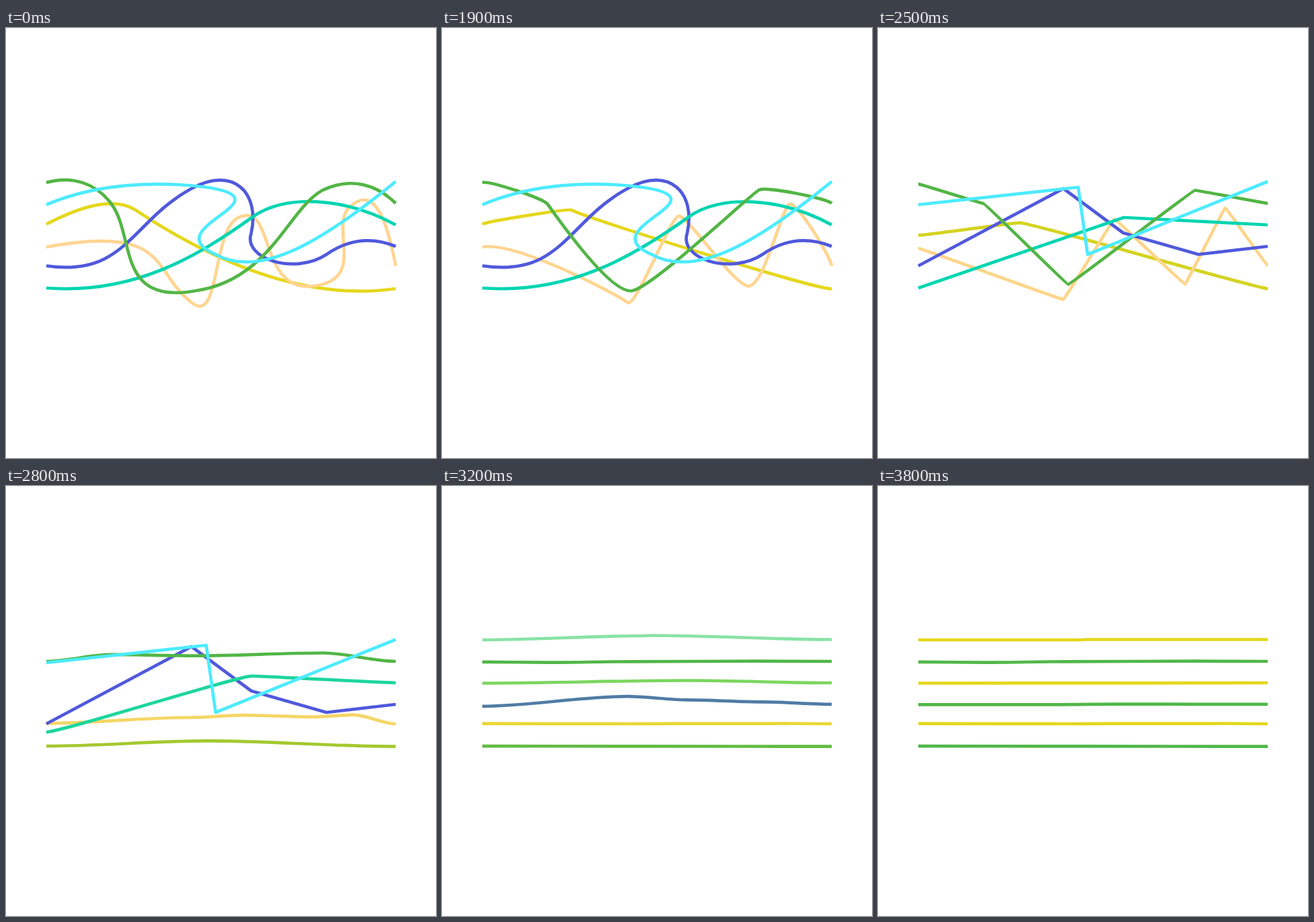
An HTML page that plays this animation: 640 by 640 pixels, repeating every 6.7 s.

```html
<!DOCTYPE html>
<html lang="en">
<head>
<meta charset="utf-8">
<title>Untangling lines</title>
<style>
  html, body { margin: 0; width: 100%; height: 100%; overflow: hidden; background: #fff; }
  svg { display: block; width: 100%; height: 100%; }
  path { fill: none; stroke-width: 4.7; stroke-linejoin: round; }
</style>
</head>
<body>
<svg id="stage" viewBox="0 0 640 640"></svg>
<script>
const LOOP = 6700, STEP = 100;
const MOVE = 400, SETTLE = 250, GAP = 800;
const YELLOW = [229, 215, 28], GREEN = [80, 184, 72];

const stage = document.getElementById('stage');
const lines = [];

const clamp = x => Math.max(0, Math.min(1, x));
const ease = x => { x = clamp(x); return x * x * (3 - 2 * x); };
const mix = (a, b, p) => a + (b - a) * p;

// curl: tangled bezier; flat: resting heights of its vertices;
// start: when it flattens; bow: overshoot; fade: colour change from/to.
function line(curl, flat, start, bow, from, to, fade, flatX) {
  const n = curl.match(/[\d.]+/g).map(Number);
  const pts = [];
  for (let i = 0; i < n.length; i += 2) pts.push([n[i], n[i + 1]]);
  const el = document.createElementNS('http://www.w3.org/2000/svg', 'path');
  stage.append(el);
  const knots = pts.filter((_, i) => i % 3 === 0);
  lines.push({ el, pts, knots, flat, start, bow, from, to, fade,
    flatX: flatX || knots.map(k => k[0]) });
}

line('60 292C118 262 163 252 193 271C300 342 440 408 580 388',
  [387.1, 387.4, 387.6], 2394, -8, YELLOW, GREEN, [2395, 3310], [60, 300, 580]);

line('60 326C245 292 216 362 276 408.5C322 445 304 288 352 280C398 265 378 394 457 384' +
  'C543 375 474 287 517 262C549 238 567 286 580 354',
  [353.7, 354, 353.6, 353.7, 353.5, 354], 2436, -11, [255, 213, 145], YELLOW, [2440, 3400]);

line('60 354C178 371 186 288 276 239C340 204 378 247 365 305C352 344 430 368 477 337' +
  'C510 314 545 311 580 325',
  [325.3, 325.3, 324.6, 324.8, 324.8], 2873, -5, [80, 89, 220], GREEN, [2850, 3800]);

line('60 387C190 397 285 340 366 282C414 246 505 252 580 293',
  [293.5, 293.4, 293], 2678, -7.5, [0, 213, 177], YELLOW, [2680, 3640]);

line('60 230C100 219 135 232 157 262C193 311 163 413 283 391C395 374 420 268 472 241' +
  'C515 221 553 234 580 261',
  [261.8, 262.7, 261.3, 260.7, 261], 2437, -12, [82, 181, 69], GREEN, [2440, 3400]);

line('60 263C135 231 225 227.5 298 237C425 256 220 298 312 337C380 375 478 312 580 228.5',
  [229, 229, 228.5, 228.5], 2800, -6, [77, 235, 255], YELLOW, [2810, 3800]);

function outline(l, t) {
  const loose = 1 - ease((t - l.start + GAP) / MOVE);
  const p = ease((t - l.start) / MOVE);
  const bow = l.bow * p * (1 - ease((t - l.start - MOVE) / SETTLE));
  const last = l.knots.length - 1;
  const at = l.knots.map(([x, y], i) => [
    mix(x, l.flatX[i], p),
    mix(y, l.flat[i], p) + (i && i < last ? bow : 0)
  ]);
  // Handles shrink to corners, then grow level as the line flattens.
  const handle = (seg, side) => {
    const i = seg + side, k = l.knots[i], h = l.pts[seg * 3 + 1 + side];
    const reach = (l.flatX[seg + 1] - l.flatX[seg]) / 3 * (side ? -1 : 1);
    return [at[i][0] + (h[0] - k[0]) * loose + reach * p,
            at[i][1] + (h[1] - k[1]) * loose];
  };
  const show = q => q.map(v => v.toFixed(2)).join(' ');
  let d = 'M' + show(at[0]);
  for (let s = 0; s < last; s++)
    d += 'C' + [handle(s, 0), handle(s, 1), at[s + 1]].map(show).join(' ');
  return d;
}

function render(t) {
  for (const l of lines) {
    const c = clamp((t - l.fade[0]) / (l.fade[1] - l.fade[0]));
    l.el.setAttribute('d', outline(l, t));
    l.el.setAttribute('stroke', `rgb(${l.from.map((v, i) => Math.round(mix(v, l.to[i], c)))})`);
  }
}

const begin = performance.now();
function tick() {
  const t = (performance.now() - begin) % LOOP;
  render(Math.floor(t / STEP) * STEP);
  requestAnimationFrame(tick);
}
tick();
</script>
</body>
</html>
```
